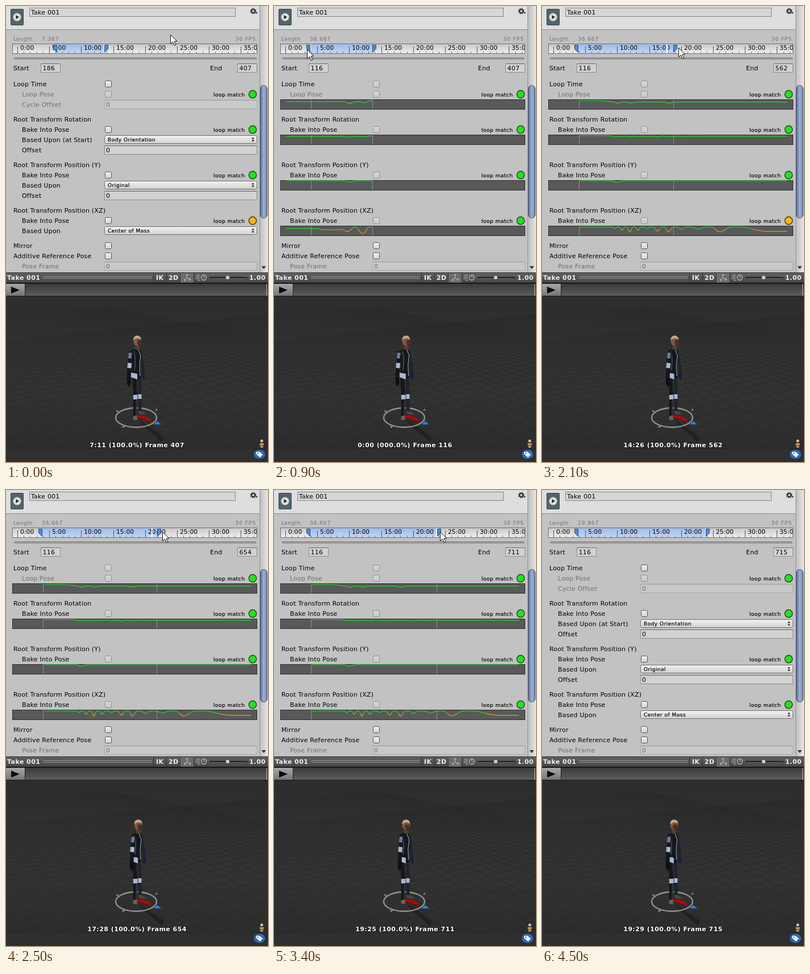
An HTML page for the animation above (5000 ms loop, 461 by 801 pixels).

```html
<!DOCTYPE html>
<html lang="en">
<head>
<meta charset="utf-8">
<title>Clip range editor</title>
<style>
html, body { margin: 0; width: 100%; height: 100%; overflow: hidden; background: #c2c2c2; }
svg { display: block; width: 461px; height: 801px; }
text { font: 11px "DejaVu Sans", sans-serif; letter-spacing: .2px; fill: #000; white-space: pre; }
.small { font-size: 9px; letter-spacing: .48px; stroke: #000; stroke-width: .2px; }
.num { font-size: 9px; letter-spacing: .95px; }
.word { font-size: 9px; letter-spacing: .48px; }
.tick { font-size: 10.8px; letter-spacing: 0; }
.dim { fill: #6f6f6f; }
.bold { font-weight: bold; letter-spacing: .45px; fill: #f0f0f0; }
.drag, .dragging .idle { display: none; }
.dragging .drag { display: inline; }
.dragging .lock, .off { opacity: .45; }
</style>
</head>
<body>
<svg id="stage" viewBox="0 0 461 801"></svg>
<script>
const LOOP = 5000, CLIP_FRAMES = 1100;
const GRAB_START = 700, DROP_START = 1100, GRAB_END = 1800, DROP_END = 4400, LEAVE = 4500;
const SECTIONS = ['rot', 'y', 'xz'];
const STRIPS = { loop: 164 };
SECTIONS.forEach((id, i) => STRIPS[id] = 226 + 80 * i);

const clamp = x => Math.min(1, Math.max(0, x));
const ramp = (x, from, to) => clamp((x - from) / (to - from));
const mix = (a, b, u) => a + (b - a) * u;

// Linear interpolation through [time, value] keys
function track(keys, t) {
  const i = keys.findIndex(k => k[0] > t);
  if (i < 0) return keys[keys.length - 1][1];
  if (i === 0) return keys[0][1];
  const [t0, v0] = keys[i - 1], [t1, v1] = keys[i];
  return mix(v0, v1, ramp(t, t0, t1));
}

const startAt = t => Math.floor(track([[GRAB_START, 186], [900, 116]], t));
const endAt = t => Math.floor(track([[GRAB_END, 407], [2000, 532], [2100, 562], [2700, 700],
  [2900, 701], [3400, 711], [3900, 711], [4100, 715]], t));
const stripX = f => 22 + f * 409 / CLIP_FRAMES;
const rulerX = f => 20.5 + f / 30 * 11.24;

function pointerAt(t) {
  if (t >= LEAVE) return [-40, 0];
  if (t < GRAB_START) {
    const u = clamp(t / 500), bend = (a, b, c) => mix(mix(a, b, u), mix(b, c, u), u);
    return [bend(289, 20, 84), bend(50, 125, 76)];
  }
  if (t < DROP_START) return [rulerX(startAt(t)) - 6, 76];
  if (t < GRAB_END) {
    const u = track([[1000, 0], [1300, .7], [1400, .7], [1700, 1]], t);
    return [mix(58, 178, u), mix(76, 73, u)];
  }
  return [rulerX(endAt(t + 50)) + 5, 73];
}

// Match curves: depth below the strip's top at x
const bump = (x, centre, width) => Math.exp(-(((x - centre) / width) ** 2));
const stride = x => 10 * (1 - (Math.max(0, 431 - x) / 303) ** 2.44);
const swing = x => Math.cos(Math.PI * stride(x)) ** 2 * ramp(x, 116, 126);
const dip = x => 2.6 * bump(x, 133, 6) + .2;
const startLoop = x => 3 + 3 * bump(x, 133, 7) + 2 * bump(x, 158, 6) - 2 * bump(x, 171, 4);
const curves = {
  start: {
    loop: startLoop,
    rot: x => startLoop(x) / 2 + .5,
    y: dip,
    xz: x => Math.max(1.5, 4 + 2.2 * ramp(x, 76, 84)
      + 7 * ramp(x, 112, 152) * Math.cos(2 * Math.PI * (x - 128) / 28))
  },
  end: {
    loop: x => 1.2 + 2.6 * ramp(x, 100, 130) + 2 * bump(x, 133, 6) + 1.7 * (bump(x, 157, 5) + bump(x, 223, 7)),
    rot: x => .8 + ramp(x, 113, 128) + swing(x) * (1 - ramp(x, 220, 300)),
    y: dip,
    xz: x => 1.2 + swing(x) ** 2 * (6.2 + 3.3 * Math.cos(1.7 * (stride(x) - 2)))
  }
};

const each = (n, make) => Array.from({ length: n }, (_, i) => make(i)).join('');

// Markup helpers; row labels take the vertical middle of the row
const label = (x, mid, s, cls = '', more = '') => `<text x="${x}" y="${mid + 4}" class="${cls}" ${more}>${s}</text>`;
const rect = (x, y, w, h, fill, more = '') => `<rect x="${x}" y="${y}" width="${w}" height="${h}" fill="${fill}" ${more}/>`;
const disc = (x, y, r, fill, more = '') => `<circle cx="${x}" cy="${y}" r="${r}" fill="${fill}" ${more}/>`;
const path = (d, fill, more = '') => `<path d="${d}" fill="${fill}" ${more}/>`;
const stroke = (d, color, w = 1, more = '') => path(d, 'none', `stroke="${color}" stroke-width="${w}" ${more}`);
const group = (body, more = '') => `<g ${more}>${body}</g>`;
const grad = (id, dir, ...stops) => `<linearGradient id="fill-${id}" ${dir}>${stops.map((c, i) =>
  `<stop offset="${i / (stops.length - 1)}" stop-color="${c}"/>`).join('')}</linearGradient>`;
const down = (id, ...stops) => grad(id, 'x2="0" y2="1"', ...stops);
const box = (x, mid, w, cls = '') => group(rect(x + .5, mid - 7.5, w - 1, 15, '#d2d2d2', 'stroke="#8c8c8c"')
  + stroke(`M${x + 1} ${mid - 7.5}h${w - 2}`, '#686868'), `class="${cls}"`);
const check = (mid, cls = '') => rect(174.5, mid - 5.5, 11, 11, 'url(#fill-button)', `rx="2" stroke="#555" class="${cls}"`);
const lamp = (mid, id) => disc(434, mid, 7.4, '#343b24') + disc(434, mid, 6, '', `id="lamp-${id}"`)
  + label(365, mid, 'loop match', 'small');
const drop = (mid, s) => rect(173.5, mid - 7.5, 268, 14, 'url(#fill-button)', 'rx="3" stroke="#6e6e6e"')
  + label(179, mid - .7, s, 'small')
  + path(`M432 ${mid - 1.5}l2.5 -3 2.5 3zM432 ${mid + .5}l2.5 3 2.5 -3z`, '#222');
const field = (mid, s, cls = '') => label(28, mid, s, cls) + box(173, mid, 269, cls && 'off') + label(176, mid, '0', cls);

function defs() {
  const match = Object.entries(STRIPS).map(([id, y]) =>
    `<linearGradient id="match-${id}" gradientUnits="userSpaceOnUse" x1="0" x2="0" y1="${y + 1}" y2="${y + 18}">
    <stop offset=".3" stop-color="#18dc20"/><stop offset=".34" stop-color="#e2a21a"/>
    <stop offset=".66" stop-color="#e2a21a"/><stop offset=".82" stop-color="#ee4a32"/></linearGradient>`).join('');
  return `<defs>${match}
    ${down('button', '#f2f2f2', '#d2d2d2')}${down('ruler', '#c6c6c6', '#f0f0f0')}${down('range', '#a0bbe6', '#c3d6f3')}
    ${down('bar', '#626262', '#454545')}${down('track', '#3a3a3a', '#5c5c5c')}${down('play', '#a6a6a6', '#767676')}
    ${down('floor', '#2d2d2d', '#323232', '#323232', '#2d2d2d')}
    ${grad('thumb', '', '#5a6c92', '#9fb1d4', '#6f83ab')}${grad('scroll', '', '#bcbcbc', '#e6e6e6')}
    <clipPath id="rulerClip"><rect x="12" y="67" width="429" height="16"/></clipPath>
    <clipPath id="view"><rect y="510" width="461" height="267"/></clipPath></defs>`;
}

function header() {
  return rect(0, 0, 461, 801, '#c2c2c2') + rect(0, 0, 446, 41, '#dedede') + stroke('M0 41.5h446', '#8b8b8b')
    + rect(8.5, 5.5, 22, 28, '#53636b', 'stroke="#39464c" rx="1"')
    + disc(19.5, 19.5, 7, '#dfe3da', 'stroke="#8d9a9c"') + path('M17.500 16l5.500 3.500-5.500 3.500z', '#222')
    + rect(41.5, 3.5, 362, 15, '#d6d6d6', 'stroke="#858585"') + label(44, 11, 'Take 001')
    + disc(435, 9, 3, 'none', 'stroke="#303030" stroke-width="2.2"')
    + disc(435, 9, 4.7, 'none', 'stroke="#303030" stroke-width="1.6" stroke-dasharray="1.8 1.9"')
    + path('M439 11h4l-2 3z', '#303030')
    + label(13, 56.5, 'Length', 'word dim') + label(63, 56.5, '', 'num dim', 'id="length"')
    + label(403.5, 56.5, '30 FPS', 'num dim');
}

function ruler() {
  const marks = each(38, s => {
    const x = Math.floor(rulerX(s * 30)) + .5, major = s % 5 === 0;
    return stroke(`M${x} ${major ? 71 : 80}V83`, major ? '#555' : '#777')
      + (major ? label(x + 4.5, 73.2, s + ':00', 'tick') : '');
  });
  return rect(11.5, 66.5, 430, 17, 'url(#fill-ruler)', 'stroke="#6f6f6f"')
    + group(`<rect id="range" y="67" height="16" fill="url(#fill-range)"/>${marks}
      <rect id="head" y="67" width="2" height="16" fill="#fff"/>`, 'clip-path="url(#rulerClip)"')
    + path('M-6.5 68.5h6v13l-6 -6z', '#4a8ce0', 'id="markL" stroke="#294e7c"')
    + path('M.5 68.5h6v7l-6 6z', '#4a8ce0', 'id="markR" stroke="#294e7c"')
    + rect(14, 90, 427, 4, '#949494', 'rx="2"')
    + label(13, 109, 'Start') + box(61, 109, 35) + label(64.5, 109, '', '', 'id="start"')
    + label(359, 109, 'End') + box(407, 109, 35) + label(410.5, 109, '', '', 'id="end"');
}

function section(id, i) {
  const axis = ['Rotation', 'Position (Y)', 'Position (XZ)'][i], choice = ['Body Orientation', 'Original', 'Center of Mass'][i];
  const top = 199 + 80 * i;
  return label(13, top, 'Root Transform ' + axis)
    + label(28, top + 18, 'Bake Into Pose') + check(top + 18, 'lock') + lamp(top + 18, id)
    + group(label(28, top + 36, i ? 'Based Upon' : 'Based Upon (at Start)') + drop(top + 36, choice)
      + (i < 2 ? field(top + 54, 'Offset') : ''), 'class="idle"');
}

const strip = id => rect(11.5, STRIPS[id] + .5, 430, 17, '#595959', 'stroke="#2d2d2d"')
  + stroke('', `url(#match-${id})`, 1.2, `id="curve-${id}"`)
  + ['lineL', 'lineR'].map(cls => stroke(`M0 ${STRIPS[id] + 1}v16`, '#8f8f8f', 1, `class="${cls}"`)).join('');

function settings() {
  return label(13, 137, 'Loop Time') + check(137, 'lock')
    + label(28, 155, 'Loop Pose', 'dim') + check(155, 'off') + lamp(155, 'loop')
    + group(field(173, 'Cycle Offset', 'dim'), 'class="idle"')
    + SECTIONS.map(section).join('')
    + group(Object.keys(STRIPS).map(strip).join(''), 'class="drag"')
    + label(13, 421, 'Mirror') + check(421) + label(13, 439, 'Additive Reference Pose') + check(439)
    + field(457, 'Pose Frame', 'dim')
    + rect(446, 0, 15, 468, 'url(#fill-scroll)') + stroke('M446.5 0V468', '#929292')
    + rect(447.5, 139.5, 12, 233, 'url(#fill-thumb)', 'rx="6" stroke="#3e4b66"')
    + path('M449.5 457h8l-4 5z', '#333');
}

function toolbar() {
  return rect(0, 468, 461, 19, 'url(#fill-bar)') + stroke('M0 468.5h461', '#2a2a2a') + label(2, 477, 'Take 001', 'bold')
    + stroke('M65 475.5h192M65 478.5h192', '#8f9d8a')
    + rect(307, 469, 23, 17, '#6c6c6c')
    + stroke('M259.5 469v17M282.5 469v17M306.5 469v17M330.5 469v17', '#333')
    + label(264, 477, 'IK', 'bold') + label(286, 477, '2D', 'bold')
    + stroke('M318.5 471v7l-5 4M318.5 478l6 3M316.5 473l2-2 2 2M314 479v3h3M322 482l3-1-1-3', '#c2c2c2')
    + disc(348, 477, 4.5, 'none', 'stroke="#bbb" stroke-width="1.3"')
    + stroke('M348 474v3h2M335 473h6M334 476h7M333 479h8M337 482h5', '#bbb')
    + stroke('M360 477.5h63', '#1d1d1d', 3, 'stroke-linecap="round"') + stroke('M360 478.5h63', '#6b6b6b')
    + disc(390, 477, 4, '#c9c9c9', 'stroke="#333"') + label(428, 477, '1.00', 'bold')
    + rect(0, 486, 461, 2, '#171717') + rect(0, 488, 461, 21, 'url(#fill-track)') + rect(0, 488, 33, 21, 'url(#fill-play)')
    + stroke('M33.5 488v21', '#222') + stroke('M458.5 488v21', '#b5b5b5') + path('M9 493l15 6-15 6z', '#0a0a0a')
    + stroke('M0 509.5h461', '#191919');
}

// Ground grid: a plane turned by 31 degrees, seen in perspective
function grid() {
  const c = Math.cos(.54), s = Math.sin(.54);
  const point = (u, v) => {
    const x = u * c - v * s, z = Math.max(-230, u * s + v * c), k = 455 / (455 + .88 * z);
    return `${(229 + x * k).toFixed(1)} ${(723 - .47 * z * k).toFixed(1)}`;
  };
  const line = (n, flip) => 'M' + Array.from({ length: 61 }, (_, i) => {
    const a = n * 30 + 8, b = (i - 20) * 45;
    return flip ? point(b, a) : point(a, b);
  }).join('L');
  return each(92, i => stroke(line((i >> 1) - 18, i % 2), '#1c1c1c', .7, 'opacity=".45"'));
}

function figure() {
  const suit = '#15171b', far = '#20232a', pad = '#a9b7d2', skin = '#7d5b44';
  const limb = (d, w, color) => stroke(d, color, w, 'stroke-linejoin="round"');
  const legs = limb('M234 648L236 684 235.500 712', 6, far) + limb('M235.500 682v8', 6, pad)
    + limb('M225.500 650L227.500 684 227 721', 7, suit) + limb('M227.500 683l.3 8', 7.500, pad)
    + path('M233 711q9 1 14 5q-6 3 -14 0z', '#494640') + path('M224 720h7l-.5 7q-4 1 -7 -1z', '#6a6259')
    + stroke('M229.500 692l-.5 28', '#59606e', .8);
  const torso = limb('M237 610l4 22 1 14', 4.500, far) + path('M240 643h4l.5 10-3 4-2-4z', '#1b1b3c')
    + path('M220 606Q226 601 231 602Q238 603 239 611L237 628 238 652 229 657 220 651 222 628z', suit)
    + path('M220 644l11 2v10l-11 -4z', pad)
    + stroke('M233 604l4 10-2 16 1 20', '#8c9ab4', 1.2) + stroke('M225 606q4 14 1 34', '#4a5260', 1.500);
  const arm = limb('M220 607L217 633 216 655', 7, suit) + limb('M219 609l-1.300 10', 5.500, '#6f7b92')
    + limb('M217.800 627l-1 9', 7, pad) + path('M213 653h6l.5 10-3 6-3.500-5z', '#0e0e13');
  const head = path('M227 594h8v9q-4 2-8 0z', '#573c2c')
    + '<ellipse cx="231" cy="588" rx="7" ry="9" fill="' + skin + '"/>'
    + path('M224 587Q224 579 231 579Q237 579 238 586Q231 581 224 587z', '#c5a78a')
    + group(path('M231 587l7-1 1.300 5-1.500 6-4 1-3-5z', '#4d3326')
      + stroke('M234 590h4M234.500 594.500h3', '#271812'), 'id="face"');
  return legs + group(torso, 'id="torso"') + group(arm, 'id="arm"') + group(head, 'id="skull"');
}

function preview() {
  return rect(0, 510, 461, 291, '#2f2f2f') + rect(0, 510, 461, 267, 'url(#fill-floor)')
    + group(grid(), 'clip-path="url(#view)"') + stroke('M0 777.5h461', '#282828')
    + path('M232 725L251 738 278 757 274 766 262 755 246 742z', '#1a1a1a', 'opacity=".6"')
    + '<ellipse cx="229" cy="723" rx="36" ry="17" fill="none" stroke="#929292" stroke-width="2.4"/>'
    + path('M193 710l6 1-3 3zM262 711l3-4 2 3zM204 738l6 0-4 4z', '#858585')
    + path('M260 735h13l-7 -6z', '#3478e5') + figure()
    + path('M228 718l19 4 10 6-6 1-19-7z', '#c40000') + stroke('M231 722l20 7', '#760000')
    + label(230.5, 771, '', 'bold', 'id="caption" text-anchor="middle" stroke="#1a1a1a" stroke-width="2" paint-order="stroke" style="fill:#fff"')
    + disc(450, 764, 2.5, '#e3c188') + path('M446 768h8l-2 8h-4z', '#b99860') + stroke('M446 772h8', '#5a4a30')
    + '<ellipse cx="446" cy="787.5" rx="10" ry="8" fill="#2e68bd"/>'
    + path('M440 783h6l6 5-5 5-7-6z', '#f2f5fa') + disc(443, 785.5, 1.2, '#2e68bd');
}

const stage = document.getElementById('stage');
stage.innerHTML = defs() + header() + ruler() + settings() + toolbar() + preview()
  + path('M.5 .5v16l4-3.5 3 6.5 2.5-1.2-3-6.3h5z', '#fff', 'id="pointer" stroke="#111"');

const $ = id => document.getElementById(id);
const move = (node, x, y = 0) => node.setAttribute('transform', `translate(${x} ${y})`);

function curvePath(id, curve, from, to) {
  const count = Math.ceil((to - from) / 1.5);
  return 'M' + Array.from({ length: count + 1 }, (_, i) => {
    const x = mix(from, to, i / count);
    return `${x.toFixed(1)} ${(STRIPS[id] + .8 + curve(x)).toFixed(2)}`;
  }).join('L');
}

let drawn = -1;
function draw(t) {
  const start = startAt(t), end = endAt(t);
  const dragL = t >= GRAB_START && t < DROP_START, dragR = t >= GRAB_END && t < DROP_END;
  const atStart = t >= GRAB_START && t < GRAB_END, side = t < GRAB_END ? 'start' : 'end';
  const left = Math.round(rulerX(start)), right = Math.round(rulerX(end));
  const trailing = endAt(t - 100); // playhead and lamps follow the end handle one step late

  stage.classList.toggle('dragging', dragL || dragR);
  move($('pointer'), ...pointerAt(t).map(Math.round));
  $('length').textContent = ((dragL || dragR ? CLIP_FRAMES : end - start) / 30).toFixed(3);
  $('start').textContent = start;
  $('end').textContent = end;
  $('range').setAttribute('x', left);
  $('range').setAttribute('width', right - left);
  $('head').setAttribute('x', Math.round(rulerX(atStart ? start : trailing)) - 1);
  move($('markL'), left);
  move($('markR'), right);

  const handle = stripX(side === 'start' ? start : trailing);
  const span = side === 'start' ? [stripX(0), stripX(end)] : [stripX(start), stripX(CLIP_FRAMES)];
  for (const id in STRIPS) {
    const curve = curves[side][id];
    $('lamp-' + id).setAttribute('fill', curve(handle) < 5.3 ? '#1fe31f' : '#fcb40c');
    $('curve-' + id).setAttribute('d', curvePath(id, curve, ...span));
  }
  stage.querySelectorAll('.lineL').forEach(n => move(n, Math.round(stripX(start)) + .5));
  stage.querySelectorAll('.lineR').forEach(n => {
    move(n, Math.round(stripX(end)) + .5);
    n.setAttribute('stroke', end === 715 ? '#4a97f5' : '#8f8f8f');
  });

  const shown = atStart ? 0 : end - start;
  $('caption').textContent = `${Math.floor(shown / 30)}:${String(shown % 30).padStart(2, '0')} `
    + `(${atStart ? '000.0' : '100.0'}%) Frame ${atStart ? start : end}`;

  // The figure leans and turns with the previewed frame
  const frame = atStart ? start : end, turn = ramp(frame, 580, 690);
  const lean = atStart ? 1.5 : 2.5 * ramp(frame, 407, 560) - turn;
  move($('torso'), lean * .6);
  move($('arm'), atStart ? 1 : 5 * ramp(frame, 407, 560));
  move($('skull'), lean);
  move($('face'), -2 * turn, turn);
}

function tick(now) {
  const t = Math.floor(now % LOOP / 100) * 100;
  if (t !== drawn) draw(drawn = t);
  requestAnimationFrame(tick);
}
draw(0);
requestAnimationFrame(tick);
</script>
</body>
</html>
```
